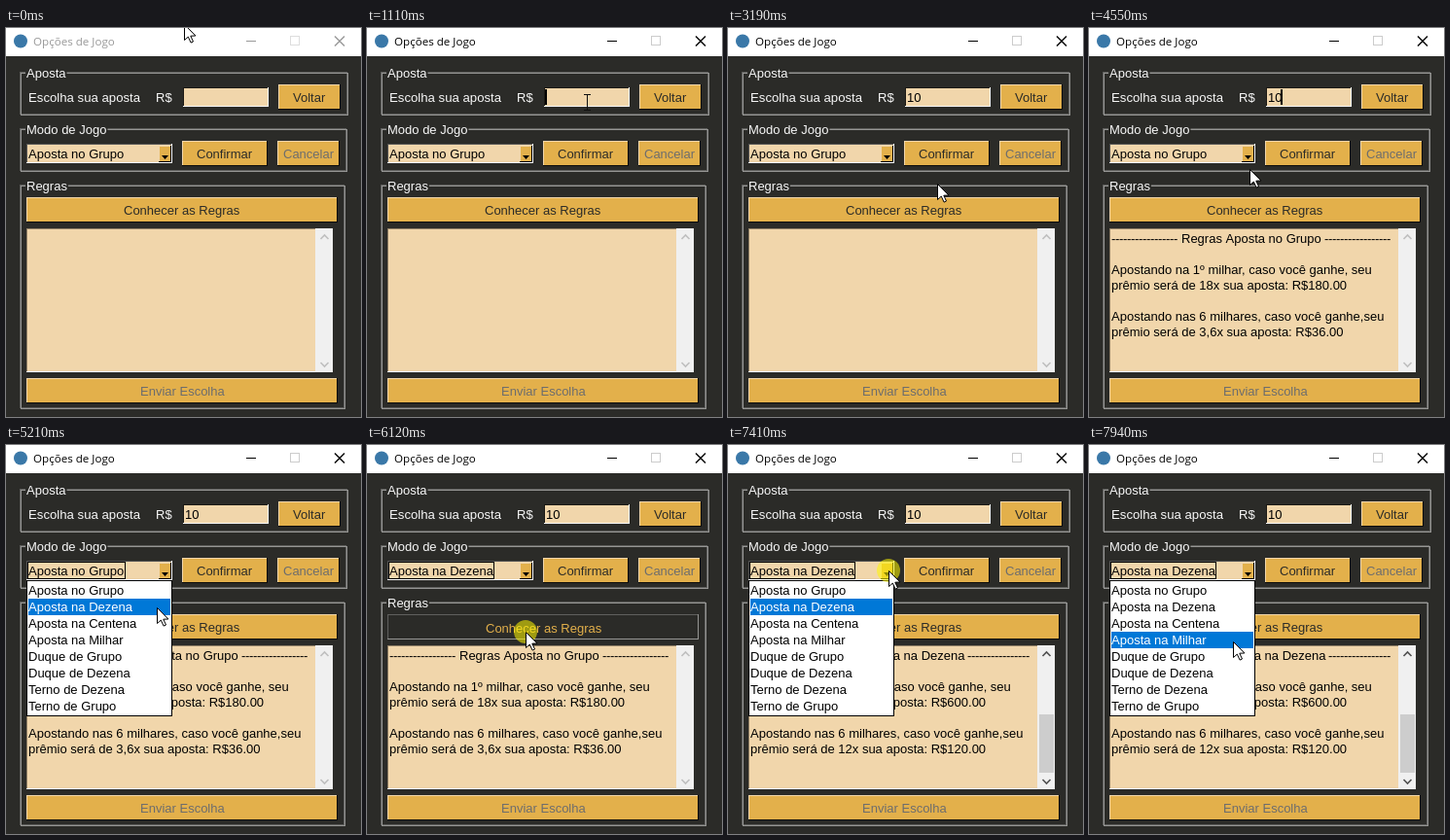
Recreate the animation shown at these times as an HTML page with a canvas. Size 365 px wide and 400 px high, loop 8000 ms.

```html
<!DOCTYPE html>
<html lang="pt">
<head>
<meta charset="utf-8">
<title>Opções de Jogo</title>
<style>
html, body { margin: 0; width: 100%; height: 100%; overflow: hidden; background: #2b2b28; }
canvas { display: block; }
</style>
</head>
<body>
<canvas id="stage" width="365" height="400"></canvas>
<script>
const ctx = document.getElementById('stage').getContext('2d');
const LOOP = 8000, BET = 10;
const DARK = '#2b2b28', SHADE = '#60605e', SHINE = '#959593';
const GOLD = '#e3b04b', SAND = '#f1d6ab', PALE = '#f8f8f8', GREY = '#6d6d6d';
const FONT = '13px "Liberation Sans", Arial, sans-serif';
const MODES = ['Aposta no Grupo', 'Aposta na Dezena', 'Aposta na Centena', 'Aposta na Milhar',
  'Duque de Grupo', 'Duque de Dezena', 'Terno de Dezena', 'Terno de Grupo'];
const PRIZES = [[18, 3.6], [60, 12]];

// mouse presses, each held for HOLD ms
const HOLD = 170;
const CLICKS = [520, 3490, 4800, 5520, 6020, 7260];
const [focusAt, showAt, openAt, pickAt, updateAt, reopenAt] = CLICKS;
const LAG = 50;

// pointer moves: start, end, x, y
const MOVES = [
  [20, 340, 226, 76], [2040, 2700, 214, 141], [3050, 3420, 216, 191],
  [4260, 4640, 162, 131], [4970, 5210, 155, 167], [5690, 5940, 163, 192],
  [6430, 7230, 165, 129], [7450, 7700, 150, 212], [7840, 7940, 148, 202]
];

// vertical motion is steady, horizontal motion eases out
function pointerAt(t) {
  let x = 183, y = -4;
  for (const [start, end, toX, toY] of MOVES) {
    const k = Math.min(1, Math.max(0, (t - start) / (end - start)));
    x += (toX - x) * k * (2 - k);
    y += (toY - y) * k;
  }
  return [Math.round(x), Math.round(y)];
}

function box(x, y, w, h, color) {
  ctx.fillStyle = color;
  ctx.fillRect(x, y, w, h);
}

function outline(x, y, w, h, color) {
  ctx.strokeStyle = color;
  ctx.lineWidth = 1;
  ctx.strokeRect(x + .5, y + .5, w - 1, h - 1);
}

function text(str, x, y, color = '#000', font = FONT) {
  ctx.font = font;
  ctx.fillStyle = color;
  ctx.fillText(str, x, y);
}

function widthOf(str) {
  ctx.font = FONT;
  return ctx.measureText(str).width;
}

function line(points, color, width) {
  ctx.strokeStyle = color;
  ctx.lineWidth = width;
  ctx.beginPath();
  points.forEach(([x, y]) => ctx.lineTo(x, y));
  ctx.stroke();
}

function disc(x, y, r, color) {
  ctx.fillStyle = color;
  ctx.beginPath();
  ctx.arc(x, y, r, 0, 2 * Math.PI);
  ctx.fill();
}

function chevron(x, y, dir, color) {
  line([[x - 4, y - 2 * dir], [x, y + 2 * dir], [x + 4, y - 2 * dir]], color, 1.6);
}

function bevel(x, y, w, h, fill, topLeft, bottomRight) {
  box(x, y, w, h, bottomRight);
  box(x, y, w - 1, h - 1, topLeft);
  box(x + 1, y + 1, w - 2, h - 2, fill);
}

function button(label, x, y, w, color = DARK, pressed = false) {
  const tx = x + Math.round((w - widthOf(label)) / 2);
  if (pressed) {
    bevel(x, y, w, 26, DARK, SHADE, SHINE);
    text(label, tx + 1, y + 19, GOLD);
  } else {
    bevel(x, y, w, 26, GOLD, SAND, '#0c0c0b');
    text(label, tx, y + 18, color);
  }
}

function group(label, y, w, h) {
  outline(14, y - 1, w, h, SHADE);
  outline(15, y, w, h, SHINE);
  box(20, y - 2, widthOf(label) + 2, 4, DARK);
  text(label, 21, y + 5, PALE);
}

function titleBar(active) {
  const ink = active ? '#000' : '#999';
  box(0, 0, 365, 29, '#fff');
  disc(15, 13.5, 7, '#3a78a8');
  text('Opções de Jogo', 28, 18, ink, '11.6px "Open Sans", "Noto Sans", sans-serif');
  box(247, 13, 10, 1, ink);
  outline(292, 8, 10, 10, active ? '#ccc' : '#ddd');
  for (const dir of [-1, 1]) line([[338, 13.5 - 5 * dir], [348, 13.5 + 5 * dir]], ink, 1.4);
}

function combo(value, focused) {
  bevel(21, 119, 150, 20, SAND, '#555', '#fff');
  text(value, 23, 134);
  if (focused) outline(22, 120, widthOf(value) + 3 | 0, 18, '#000');
  bevel(157, 121, 13, 17, GOLD, SAND, '#000');
  ctx.fillStyle = '#000';
  ctx.beginPath();
  ctx.moveTo(160, 131);
  ctx.lineTo(167, 131);
  ctx.lineTo(163.5, 135);
  ctx.fill();
}

function rulesText(mode) {
  const title = 'Regras ' + MODES[mode];
  const [first, six] = PRIZES[mode];
  const prize = factor =>
    `prêmio será de ${String(factor).replace('.', ',')}x sua aposta: R$${(BET * factor).toFixed(2)}`;

  const count = Math.round((279 - widthOf(title)) / 8), dashes = '-'.repeat(count);
  ctx.letterSpacing = '-0.33px';
  text(dashes, 23, 221);
  text(dashes, 310 - 4 * count, 221);
  ctx.letterSpacing = '0px';
  text(title, 27 + 4 * count, 221);

  ['', '', 'Apostando na 1º milhar, caso você ganhe, seu', prize(first), '',
    'Apostando nas 6 milhares, caso você ganhe,seu', prize(six)]
    .forEach((row, i) => text(row, 23, 221 + 16 * i));
}

function rulesArea(mode) {
  const scrolls = mode === 1, ink = scrolls ? '#505050' : '#bfbfbf';
  bevel(21, 206, 298, 148, SAND, '#918066', '#fff');
  box(318, 206, 18, 148, '#f0f0f0');
  if (scrolls) box(320, 277, 15, 60, '#cdcdcd');
  chevron(327.5, 215, -1, ink);
  chevron(327.5, 346, 1, ink);
  if (mode >= 0) rulesText(mode);
}

function dropdown(selected) {
  box(21, 139, 150, 140, '#000');
  box(22, 140, 148, 138, '#fff');
  MODES.forEach((mode, i) => {
    const on = i === selected, y = 141 + 17 * i;
    if (on) box(23, y, 146, 17, '#0078d7');
    text(mode, 23, y + 13, on ? '#fff' : '#000');
  });
}

function pointer(x, y, clicking) {
  if (clicking) disc(x, y, 12, 'rgba(255,248,0,.55)');
  // text cursor while over the entry field
  if (x > 182 && x < 270 && y > 62 && y < 81) {
    box(x, y - 8, 1, 16, '#111');
    for (const end of [-8, 8]) box(x - 3, y + end, 7, 1, '#111');
    return;
  }
  ctx.beginPath();
  [[0, 0], [0, 16], [3.8, 12.6], [6.6, 18.6], [9, 17.5], [6.3, 11.7], [11.4, 11.5]]
    .forEach(([dx, dy]) => ctx.lineTo(x + dx + .5, y + dy + .5));
  ctx.closePath();
  ctx.fillStyle = '#fff';
  ctx.fill();
  ctx.strokeStyle = '#000';
  ctx.lineWidth = 1;
  ctx.stroke();
}

function draw(t) {
  const [px, py] = pointerAt(t);
  const clicking = CLICKS.some(at => t >= at && t < at + HOLD);
  const chosen = t < pickAt + LAG ? 0 : 1;
  const open = (t >= openAt + LAG && !chosen) || t >= reopenAt + LAG;
  const shown = t < showAt + HOLD ? -1 : t < updateAt + HOLD ? 0 : 1;
  const typed = String(BET).slice(0, Math.max(0, Math.ceil((t - 1320) / 70)));

  box(0, 0, 365, 400, DARK);
  titleBar(t >= focusAt);

  group('Aposta', 46, 337, 44);
  text('Escolha sua aposta', 23, 76, PALE, FONT.replace('13px', '13.2px'));
  text('R$', 154, 76, PALE);
  bevel(182, 61, 88, 20, SAND, '#1c1a15', PALE);
  text(typed, 184, 76);
  const blinkOn = (t - focusAt) % 900 < 600;
  if (t >= focusAt && t < openAt + LAG && blinkOn) box(183 + 7 * typed.length, 63, 2, 16, '#000');
  button('Voltar', 280, 58, 64);

  group('Modo de Jogo', 104, 336, 44);
  combo(MODES[chosen], t >= openAt + LAG);
  button('Confirmar', 181, 116, 88);
  button('Cancelar', 279, 116, 64, GREY);

  group('Regras', 162, 334, 230);
  button('Conhecer as Regras', 21, 174, 320, DARK, clicking && !open && py > 174);
  rulesArea(shown);
  button('Enviar Escolha', 21, 360, 320, GREY);

  if (open) dropdown(py >= 141 ? Math.floor((py - 141) / 17) : chosen);
  pointer(px, py, clicking);
}

function tick() {
  draw(performance.now() % LOOP);
  requestAnimationFrame(tick);
}
tick();
</script>
</body>
</html>
```
